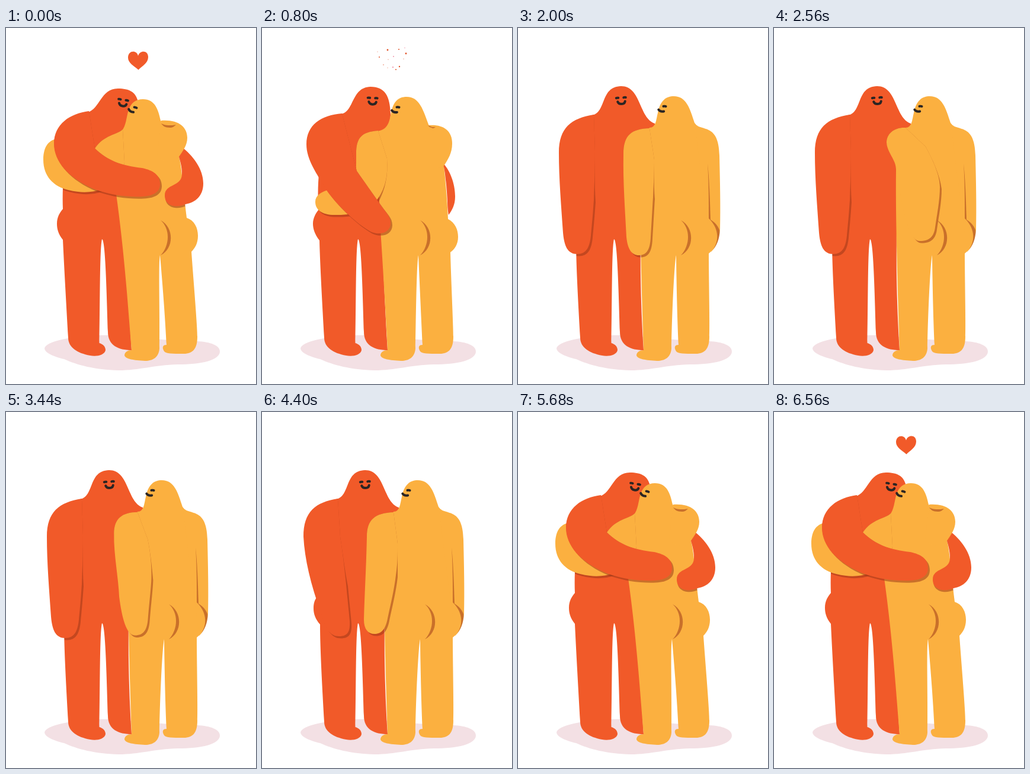
An HTML page with a canvas for the animation above (6.64 s loop, 422 by 600 pixels).

```html
<!DOCTYPE html>
<html lang="en">
<head>
<meta charset="utf-8">
<title>Hug</title>
<style>
html, body { margin: 0; width: 100%; height: 100%; overflow: hidden; background: #fff; }
canvas { display: block; }
</style>
</head>
<body>
<canvas id="stage" width="422" height="600"></canvas>
<script>
const ctx = document.getElementById('stage').getContext('2d');
const LOOP = 6640, STEP = 80;
const RED = '#f15a29', YELLOW = '#fbb040', INK = '#2b2523', SHADE = 'rgba(156,53,21,.52)', GROUND = '#f3e0e4';

// Poses: A hug, B half open, C apart, N at rest, D/U scratching, E reaching, F closing in
const timeline = [[0, 'A'], [160, 'A'], [800, 'B'], [1280, 'C'], [1600, 'N'], [2240, 'N'], [2560, 'D'],
  [2720, 'U'], [2880, 'D'], [3040, 'U'], [3200, 'D'], [3600, 'N'], [4160, 'N'], [4400, 'E'], [4760, 'B'],
  [5120, 'F'], [5640, 'A'], [LOOP, 'A']];
const fallback = { N: 'C', D: 'N', U: 'D', E: 'N', F: 'A' };

const nums = s => s.trim().split(/[\s,]+/).map(Number);

// Each outline is a start point followed by cubic segments
const redBody = top => top + ` 205,400 208,480 212,543 190,543 172,535 172,512 170,450 168,356 162,356
  158,372 159,470 157.5,531 164,533 168,537 168,543 166,552 152,554 142,552 120,548 105,538 105,522 102,470 98,400 `
  + top.trim().split(' ')[0];
const yellowBody = (top, crotch, edge) => top + ` 323,540 316,549 300,549 280,549 270,549 267,545
  262,537 266,534 271,534 268,470 ${crotch},383 ${crotch},383 ${crotch - 3},395 260,480 259,540
  258,555 248,561 235,561 215,560 202,558 200,552 200,546 206,543 212,543 ` + edge;

const poses = {
  redBody: {
    A: redBody('96,357 88,347 86,338 86,330 86,318 91,311 96,305 95,260 95,200 138,142 158,137 160,102 189,102 208,102 218,108 222,121 215,160 205,220 200,300'),
    B: redBody('97,358 89,348 86,338 86,330 86,320 91,312 95,307 94,260 92,200 133,145 156,142 150,100 183,99 208,99 216,115 217,145 217,170 200,200 200,300'),
    C: redBody('98,358 90,349 87,340 87,331 87,322 89,317 92,313 90,260 88,200 125,147 150,142 138,99 174,98 208,98 204,152 231,161 231,200 215,240 208,300'),
    F: redBody('97,358 89,348 86,338 86,330 86,319 91,312 96,306 95,260 95,200 134,144 155,140 152,100 183,99 203,99 212,108 214,126 214,160 205,220 200,300')
  },
  redArm: {
    A: '140,140 108,144 81,162 81,195 81,225 105,253 150,272 178,282 205,285 230,284 250,283 260,276 260,263 260,247 248,240 230,236 195,232 172,224 150,203',
    B: '135,144 100,147 75,163 75,196 75,222 92,245 110,275 128,300 160,330 183,343 200,351 217,344 217,329 217,316 208,310 200,298 188,281 172,258 160,241',
    C: '128,146 90,152 69,168 69,210 69,255 71,300 71,345 71,368 80,380 96,380 113,380 119,370 121,350 124,320 126,300 127,285 129,255 130,230 130,200',
    N: '128,146 90,152 69,168 69,210 69,255 73,300 76,345 78,368 84,381 100,381 115,381 121,370 123,350 126,320 127,305 128,290 129,260 130,235 130,208',
    E: '128,146 90,152 70,168 70,210 72,248 82,290 100,340 106,365 115,378 130,378 145,378 149,370 148,352 146,330 144,312 142,290 139,262 136,235 132,210',
    F: '135,144 100,148 79,168 79,196 79,228 107,259 150,276 178,286 205,289 232,289 250,289 258,281 258,271 258,257 249,249 232,244 198,236 172,226 150,206'
  },
  redFarArm: {
    A: '296,200 316,215 333,238 333,262 333,283 320,294 303,297 290,303 268,302 268,282 268,262 297,268 297,246 297,234 294,224 291,214',
    B: '303,225 317,238 326,262 326,284 326,298 321,307 315,315 314,310 313,300 313,292 312,275 311,262 310,256 309,245 308,238 306,230',
    C: '320,280 '.repeat(16),
    F: '296,205 315,218 331,242 331,264 330,285 318,297 300,299 288,303 278,298 278,285 278,272 298,268 298,245 298,235 296,225 294,215'
  },
  yellowBody: {
    A: yellowBody('186,280 188,250 190,200 195,174 203,165 203,150 207,138 211,126 219,120 231,120 252,120 257,138 261,156 275,170 285,195 292,217 296,230 298,260 305,320 318,324 324,337 324,350 324,363 319,371 313,377 316,420 323,500 323,520', 260, '206,470 200,380 186,280'),
    B: yellowBody('200,340 198,300 196,210 193,174 213,172 215,158 218,142 222,124 230,116 244,116 266,116 272,138 282,165 290,180 300,210 307,232 310,260 313,295 314,322 326,328 331,340 331,352 331,365 325,373 318,378 319,420 323,500 323,520', 264, '208,470 204,400 200,340'),
    C: yellowBody('206,240 206,210 215,180 222,168 233,168 233,155 236,143 240,122 250,115 263,115 284,115 290,135 298,160 315,180 320,210 320,230 322,260 322,290 322,322 332,328 337,340 337,352 337,365 330,374 322,380 322,420 324,500 323,520', 267, '209,450 205,320 206,240'),
    F: yellowBody('188,283 189,250 190,200 196,175 203,166 203,152 207,138 211,125 219,118 232,118 255,118 260,140 267,162 278,180 288,200 295,217 298,232 300,265 307,320 319,325 326,338 326,351 326,364 320,372 314,377 316,420 323,500 323,520', 261, '207,470 201,380 188,283')
  },
  yellowArm: {
    A: '197,171 188,180 165,180 150,203 140,205 125,195 110,190 80,180 63,192 63,222 63,250 80,267 105,273 130,279 145,277 160,272 185,260 198,245 200,226',
    B: '196,173 168,175 159,185 159,212 159,235 160,250 150,262 135,270 90,270 90,293 90,307 102,315 122,315 160,316 182,306 193,291 208,272 213,250 211,220',
    C: '222,169 192,170 178,180 178,212 177,260 181,310 183,352 185,373 192,383 204,383 217,383 223,374 224,352 226,320 227,300 228,285 229,262 230,240 230,222',
    D: '222,168 203,167 190,178 190,193 191,210 206,222 206,238 215,290 225,359 246,359 262,359 270,352 272,336 275,315 280,290 280,268 280,248 268,222 256,200',
    U: '222,168 203,167 190,178 190,193 191,210 206,222 206,238 215,286 227,352 249,352 265,352 273,345 275,329 278,310 282,286 282,264 282,246 268,220 256,200',
    E: '222,169 190,170 177,182 177,210 176,260 173,310 172,350 172,366 179,374 190,374 203,374 209,364 212,348 218,320 223,300 226,275 229,255 229,240 229,222',
    F: '197,172 188,180 165,182 151,206 141,210 125,222 110,226 82,225 72,232 72,246 72,268 90,282 113,285 140,288 155,284 168,278 188,262 199,245 201,228'
  },
  yellowFarArm: {
    A: '262,156 290,154 306,166 306,185 306,198 298,208 292,217 285,230 270,230 255,215',
    B: '281,164 305,162 321,172 321,195 321,210 314,222 307,232 300,240 285,235 270,215',
    C: '298,160 308,176 339,158 340,215 341,260 336,295 331,331 325,345 315,330 300,300',
    N: '298,160 308,176 339,158 340,215 341,260 342,300 341,340 340,355 336,368 326,377',
    F: '266,162 292,160 308,168 308,187 308,198 301,208 295,217 285,230 270,230 258,215'
  },
  crease: {
    A: '262,161 266,163 270,164 274,164 279,164 283,164 287,163 284,166 281,168 277,168 273,168 269,167 267,166 265,164 263,163 262,161',
    B: '280,164 283,165 285,166 287,167 289,167 291,167 293,167 291,168 290,169 288,169 286,168 284,167 283,167 282,166 281,165 280,164',
    C: '320,228 322,258 322,290 322,322 325,324 329,328 331,331 331,332 331,333 331,334 329,331 327,328 325,323 324,290 323,255 320,228',
    N: '320,228 322,258 322,292 322,321 333,331 344,352 329,374 341,363 343,345 339,338 336,331 330,326 325,323 324,290 323,255 320,228',
    F: '265,160 269,164 273,166 277,167 282,168 287,168 292,167 288,169 284,170 279,169 275,169 271,167 269,165 267,163 266,162 265,160'
  },
  cleft: { A: '0', B: '6', C: '14', F: '1' },
  // x, y, tilt in degrees
  redFace: { A: '197.5,124 10', B: '186.5,121 3', C: '171.5,121 -8', N: '174,120.5 -4', F: '185.5,121 0' },
  yellowFace: { A: '218.5,134 17', B: '229.5,133.5 4', C: '247.5,132 2', F: '218.5,134 12' }
};
for (const part of Object.values(poses)) for (const k in part) part[k] = nums(part[k]);

const poseOf = (part, key) => part[key] || poseOf(part, fallback[key]);

// Monotone cubic interpolation through the timeline
function sample(name, t) {
  const last = timeline.length - 1;
  let i = 0;
  while (i < last - 1 && timeline[i + 1][0] <= t) i++;
  const at = k => poseOf(poses[name], timeline[k][1]);
  const h = timeline[i + 1][0] - timeline[i][0], u = (t - timeline[i][0]) / h;
  return at(i).map((a, j) => {
    const rate = k => k < 0 || k >= last ? 0 : (at(k + 1)[j] - at(k)[j]) / (timeline[k + 1][0] - timeline[k][0]);
    const slope = k => {
      const p = rate(k - 1), q = rate(k);
      return p * q > 0 ? 2 * p * q / (p + q) : 0;
    };
    const b = at(i + 1)[j], w = u * u * (3 - 2 * u);
    return a + (b - a) * w + h * u * (1 - u) * ((1 - u) * slope(i) - u * slope(i + 1));
  });
}

function trace(p) {
  ctx.beginPath();
  ctx.moveTo(p[0], p[1]);
  for (let i = 2; i < p.length; i += 6) ctx.bezierCurveTo(...p.slice(i, i + 6));
}

function fill(p, color, mode = 'source-over') {
  ctx.globalCompositeOperation = mode;
  ctx.fillStyle = color;
  trace(p);
  ctx.closePath();
  ctx.fill();
  ctx.globalCompositeOperation = 'source-over';
}

const shade = p => fill(p, SHADE, 'source-atop');
const shift = (p, dx, dy) => p.map((v, i) => v + (i % 2 ? dy : dx));

// The shadow stays pinned at the shoulder and widens toward the hand
function arm(p, color) {
  const moved = shift(p, 3, 3.5);
  shade(p.map((v, i) => i > 7 && i < 32 ? moved[i] : v));
  fill(p, color);
}

function face([x, y, tilt], lines) {
  ctx.save();
  ctx.translate(x, y);
  ctx.rotate(tilt * Math.PI / 180);
  ctx.strokeStyle = INK;
  ctx.lineWidth = 4;
  ctx.lineCap = 'round';
  for (const line of lines) { trace(line); ctx.stroke(); }
  ctx.restore();
}

const ground = nums(`65,540 67,528 110,520 150,518 200,516 250,527 323,528 345,529 361,535 361,545
  361,560 330,567 290,567 250,568 225,577 190,577 150,576 120,568 98,558 85,555 66,549 65,540`);
const cleft = nums('261,324 284,336 284,372 261,383 277,366 277,338 261,324');
const heart = nums('0,-8 -2,-18 -17,-18 -17,-5 -17,4 -7,9 .5,15.5 7,9 17,4 17,-6 17,-18 3,-18 0,-8');
const redLines = ['-8,-3 -7,-3.3 -6,-3.3 -4.5,-3', '4.5,-3 6,-3.3 7,-3.3 8,-3', '-6,3.5 -4,9 5,9 6.5,3.5'].map(nums);
const yellowLines = ['-2,0 -1,-.3 1,-.3 2,0', '-10,6 -8,8.5 -5,9.5 -1,8.5'].map(nums);
// x, y, radius
const sparks = nums(`195,40,.5 212,37,1.4 231,36,1 241,33.5,.7 243,43,1.4 198,49,1 213,53,.6 222,48,.9
  239,52,.6 205,62,.7 212,67,.5 221,66,1.1 226,70,1 232,65,1.2`);

const clamp = v => Math.max(0, Math.min(1, v));
const easeOut = v => 1 - (1 - clamp(v)) ** 3;

function drawHeart(t) {
  const pop = t < 3000 ? 1 - clamp((t - 240) / 200) ** 2 : easeOut((t - 5840) / 400);
  const dy = t < 3000 ? -t / 120 : (LOOP - t) / 100;
  if (pop > 0) fill(shift(heart.map(v => v * pop), 223, 55 + dy), RED);
  if (t < 360 || t > 1040) return;
  const spread = easeOut((t - 320) / 480), size = 1 + (800 - t) / 240;
  for (let i = 0; i < sparks.length; i += 3) {
    const [x, y, r] = sparks.slice(i, i + 3);
    ctx.fillStyle = i % 4 === 1 ? '#ee8aa0' : '#e2552b';
    ctx.beginPath();
    ctx.arc(221 + (x - 221) * spread, 52 + (y - 52) * spread, r * Math.max(0, size), 0, 7);
    ctx.fill();
  }
}

function draw(t) {
  ctx.clearRect(0, 0, 422, 600);
  const get = name => sample(name, t);

  fill(get('redBody'), RED);
  face(get('redFace'), redLines);
  fill(get('yellowBody'), YELLOW);
  shade(shift(cleft, get('cleft')[0], 0));

  const far = get('redFarArm');
  shade(shift(far, 1, 3));
  fill(far, RED);
  fill(get('yellowFarArm'), YELLOW);
  shade(get('crease'));

  arm(get('yellowArm'), YELLOW);
  arm(get('redArm'), RED);
  face(get('yellowFace'), yellowLines);

  drawHeart(t);
  fill(ground, GROUND, 'destination-over');
}

const start = performance.now();
function tick() {
  const t = Math.max(0, performance.now() - start) % LOOP;
  draw(Math.floor(t / STEP) * STEP);
  requestAnimationFrame(tick);
}
tick();
</script>
</body>
</html>
```
